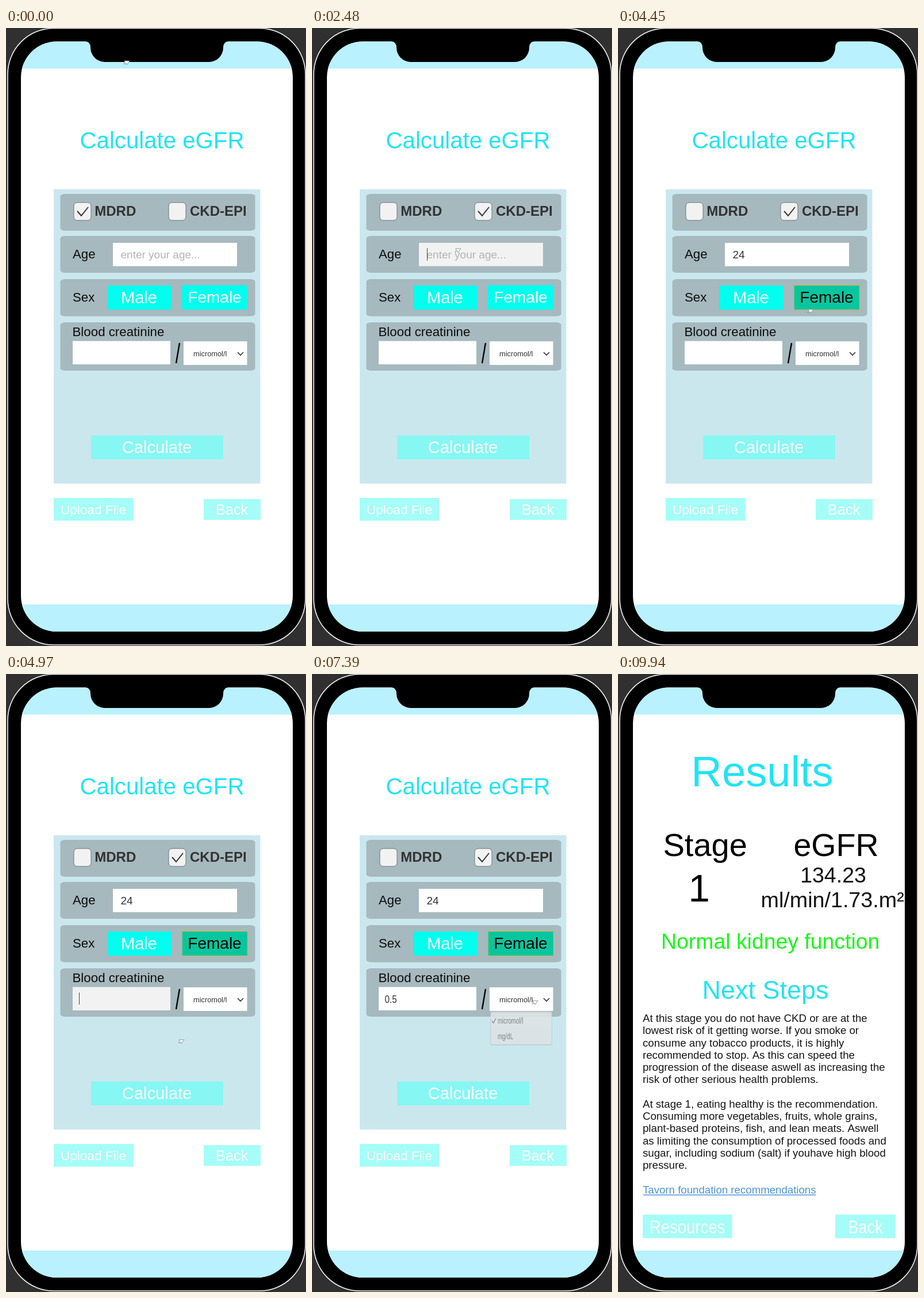
Write an HTML page with a canvas that moves like this. It is 522 px wide and 1073 px high and loops after 10000 ms.

```html
<!DOCTYPE html>
<html lang="en">
<head>
<meta charset="utf-8">
<title>eGFR calculator</title>
<style>
html, body { margin: 0; width: 100%; height: 100%; overflow: hidden; background: #303030; }
canvas { display: block; width: 522px; height: 1073px; }
</style>
</head>
<body>
<canvas id="stage" width="522" height="1073"></canvas>
<script>
const ctx = document.getElementById('stage').getContext('2d');
const LOOP = 10000;
const SANS = '"Liberation Sans", Arial, sans-serif';
const CYAN = '#22e3f5', AQUA = '#00ffee', PALE = '#a5fdf7', ACTIVE = '#f2f2f2', INK = '#323232';

// Moments of the interaction, in ms
const AT = {
  tick: 960, age: 2150, female: 4300, blood: 4700,
  open: 7300, pick: 7800, press: 8480, result: 8800
};
const AGE_KEYS = [3200, 3450];
const BLOOD_KEYS = [5450, 5650, 5850];

// Pointer path: time, x, y
const PATH = [
  [0, 210, 60], [120, 210, 60], [850, 298, 322], [1150, 298, 322],
  [1950, 254, 386], [3350, 254, 386], [3940, 269, 476], [4200, 362, 474],
  [4380, 362, 474], [4640, 215, 570], [4740, 215, 570], [4970, 305, 638],
  [5250, 318, 646], [6400, 318, 646], [7150, 388, 570], [7450, 388, 570],
  [7720, 350, 629], [7880, 350, 629], [8400, 299, 738], [9360, 299, 738],
  [9880, 535, 640]
];

const clamp = v => Math.max(0, Math.min(1, v));
const ease = v => v * v * (3 - 2 * v);
const fade = (t, start, ms = 100) => clamp((t - start) / ms);

function rect(x0, y0, x1, y1, fill, r = 0) {
  ctx.beginPath();
  ctx.roundRect(x0, y0, x1 - x0, y1 - y0, r);
  ctx.fillStyle = fill;
  ctx.fill();
}

function line(points, color, width) {
  ctx.beginPath();
  points.forEach(([x, y]) => ctx.lineTo(x, y));
  ctx.strokeStyle = color;
  ctx.lineWidth = width;
  ctx.stroke();
}

function text(str, x, y, size, color, { align = 'left', weight = 'normal', squeeze = 1 } = {}) {
  ctx.save();
  ctx.translate(x, y);
  ctx.scale(squeeze, 1);
  ctx.font = `${weight} ${size}px ${SANS}`;
  ctx.textAlign = align;
  ctx.fillStyle = color;
  ctx.fillText(str, 0, 0);
  ctx.restore();
}

const centered = (str, x, y, size, color, squeeze = 1) =>
  text(str, x, y, size, color, { align: 'center', squeeze });

function typed(str, keys, t) {
  return str.slice(0, keys.filter(k => t >= k).length);
}

function caret(x, y0, y1, t, start, keys) {
  const since = t - Math.max(start, ...keys.filter(k => t >= k));
  if (since % 1176 < 588) line([[x, y0], [x, y1]], '#444', 1);
}

function pointer(t) {
  const last = PATH.length - 1;
  let i = 0;
  while (i < last - 1 && t >= PATH[i + 1][0]) i++;
  const [t0, x0, y0] = PATH[i], [t1, x1, y1] = PATH[i + 1];
  const k = ease(clamp((t - t0) / (t1 - t0)));
  ctx.save();
  ctx.translate(x0 + (x1 - x0) * k, y0 + (y1 - y0) * k);
  ctx.beginPath();
  [[-4, -3], [5, -3], [0, 4], [-1, 1], [-5, 3], [-3, 0]].forEach(([x, y]) => ctx.lineTo(x, y));
  ctx.closePath();
  ctx.fillStyle = '#fafafa';
  ctx.fill();
  ctx.strokeStyle = '#7d8587';
  ctx.lineWidth = 0.8;
  ctx.stroke();
  ctx.restore();
}

function phone() {
  rect(0, 0, 522, 1073, '#303030');
  rect(3, 0.5, 521, 1071, '#000', 80);
  ctx.strokeStyle = '#f4f4f4';
  ctx.lineWidth = 1.6;
  ctx.stroke();

  ctx.save();
  ctx.beginPath();
  ctx.roundRect(26, 23.5, 473, 1024.5, 62);
  ctx.clip();
  rect(26, 23, 499, 1049, '#fff');
  rect(26, 23, 499, 70.5, '#b9f1ff');
  rect(26, 1001, 499, 1049, '#b9f1ff');
  ctx.restore();

  ctx.beginPath();
  ctx.moveTo(138, 23);
  ctx.quadraticCurveTo(147, 24, 147, 34);
  ctx.arcTo(147, 59, 172, 59, 25);
  ctx.arcTo(378, 59, 378, 34, 25);
  ctx.quadraticCurveTo(378, 24, 387, 23);
  ctx.fillStyle = '#000';
  ctx.fill();
}

function checkbox(x, label, labelX, ticked) {
  rect(x, 303, x + 30, 334, ACTIVE, 6);
  ctx.strokeStyle = '#6c7477';
  ctx.lineWidth = 1;
  ctx.stroke();
  if (ticked) line([[x + 6, 318], [x + 13, 326], [x + 25, 311]], INK, 2);
  text(label, labelX, 326, 24, INK, { weight: 'bold' });
}

function dropdown(t) {
  const picked = t >= AT.pick;
  rect(309, 544, 419.5, 585, t >= AT.open + 150 ? ACTIVE : '#fff');
  text(picked ? 'mg/dL' : 'micromol/l', 326, 570, 12.8, INK);
  line([[403, 563], [408, 568], [413, 563]], INK, 1.6);

  const alpha = fade(t, AT.open, 170) * (1 - fade(t, AT.pick, 150));
  if (!alpha) return;
  ctx.save();
  ctx.globalAlpha = alpha;
  rect(310, 585.5, 418, 645, '#b5c0c3', 2);
  rect(311, 586.5, 417, 643, '#f0f2f2', 2);
  rect(311, 589, 417, 614, t < 7650 ? '#dfe5e6' : '#f0f2f2');
  if (t >= 7650) rect(311, 616, 417, 641, '#dfe5e6');
  const tickY = picked ? 629 : 602;
  line([[313, tickY], [315.5, tickY + 4], [320, tickY - 4]], INK, 1.2);
  text('micromol/l', 323, 607, 15, INK, { squeeze: 0.65 });
  text('mg/dL', 323, 633.5, 15, INK, { squeeze: 0.65 });
  ctx.restore();
}

function form(t) {
  centered('Calculate eGFR', 271.5, 208.5, 40.2, CYAN);
  rect(83, 280, 442.5, 791, '#cbe7ee', 1);
  [[288, 352], [361, 425], [436, 500.5], [511, 595]].forEach(([top, bottom]) =>
    rect(94.5, top, 433.5, bottom, '#a6b9be', { x: 9, y: 4 }));

  const ckd = t >= AT.tick;
  checkbox(118, 'MDRD', 154.3, !ckd);
  checkbox(283, 'CKD-EPI', 320, ckd);

  const ageOn = t >= AT.age && t < AT.female;
  const age = typed('24', AGE_KEYS, t);
  text('Age', 116, 400, 22.2, '#0c0c0c');
  rect(186, 373, 402, 413.5, t >= AT.age - 200 && t < AT.female ? ACTIVE : '#fff');
  text(age || 'enter your age...', 199.5, 399.5, 19, age ? INK : '#b3b3b3');
  if (ageOn) caret(200.5 + age.length * 10.5, 382, 404, t, AT.age, AGE_KEYS);

  const female = t >= AT.female;
  text('Sex', 116, 475, 22.2, '#0c0c0c');
  rect(176, 447, 288, 489, AQUA);
  centered('Male', 231.5, 477.5, 29, '#fff');
  rect(306, 446.5, 420, 489, female ? '#07c69f' : AQUA);
  if (female) {
    ctx.strokeStyle = '#c8b75c';
    ctx.lineWidth = 1.5;
    ctx.strokeRect(306, 446.5, 114.5, 43);
  }
  centered('Female', 363, 477, 28, female ? '#000' : '#fff');

  const bloodOn = t >= AT.blood && t < AT.open - 80;
  const blood = typed('0.5', BLOOD_KEYS, t);
  text('Blood creatinine', 115.5, 535, 22.3, '#0c0c0c');
  rect(116, 543.5, 286, 584, bloodOn ? ACTIVE : '#fff');
  text(blood, 126.5, 570.5, 19, INK, { squeeze: 0.8 });
  if (bloodOn) caret(127.5 + [0, 8.5, 12.7, 21][blood.length], 553, 574, t, AT.blood, BLOOD_KEYS);
  line([[302, 547], [296, 582]], '#000', 2.4);

  rect(148, 707.5, 378, 749, '#86f7f3');
  ctx.globalAlpha = fade(t, AT.press, 130);
  rect(148, 707.5, 378, 749, '#82d9d5');
  ctx.globalAlpha = 1;
  centered('Calculate', 262.5, 738, 29.2, '#fff');
  dropdown(t);

  rect(83, 816, 221.5, 855.5, PALE);
  centered('Upload File', 152, 844, 22.5, '#fff');
  rect(344, 818, 443, 854, PALE);
  centered('Back', 393, 845, 25.5, '#fff');
}

const ADVICE = [
  'At this stage you do not have CKD or are at the',
  'lowest risk of it getting worse. If you smoke or',
  'consume any tobacco products, it is highly',
  'recommended to stop. As this can speed the',
  'progression of the disease aswell as increasing the',
  'risk of other serious health problems.',
  '',
  'At stage 1, eating healthy is the recommendation.',
  'Consuming more vegetables, fruits, whole grains,',
  'plant-based proteins, fish, and lean meats. Aswell',
  'as limiting the consumption of processed foods and',
  'sugar, including sodium (salt) if youhave high blood',
  'pressure.'
];
const LINK = 'Tavorn foundation recommendations';

function results() {
  text('Results', 127.3, 195, 74.2, CYAN);
  text('Stage', 78.5, 315.5, 56, '#000');
  text('eGFR', 305.5, 315.5, 55.5, '#000');
  text('1', 122.5, 394.5, 67, '#000');
  centered('134.23', 374.5, 362, 37.5, '#111');
  text('ml/min/1.73.m²', 248.5, 405, 37.7, '#111');
  text('Normal kidney function', 75, 477, 37.4, '#16f916');
  text('Next Steps', 146.5, 564, 45, CYAN);
  ADVICE.forEach((row, i) => text(row, 43, 604 + i * 21.27, 18.65, '#141414'));
  text(LINK, 43, 901.5, 18.65, '#4b93d8');
  ctx.font = `18.65px ${SANS}`;
  line([[44, 904.5], [43 + ctx.measureText(LINK).width, 904.5]], '#4b93d8', 1.3);
  rect(43, 938.5, 198.5, 979.5, PALE);
  centered('Resources', 120.5, 971, 32, '#fff', 0.86);
  rect(378, 938.5, 483, 979.5, PALE);
  centered('Back', 430.5, 971, 32, '#fff', 0.86);
}

function draw(now) {
  const t = now % LOOP;
  phone();
  if (t < AT.result) form(t);
  else results();
  pointer(t);
}

const start = performance.now();
function tick() {
  draw(Math.max(0, performance.now() - start));
  requestAnimationFrame(tick);
}
tick();
</script>
</body>
</html>
```
